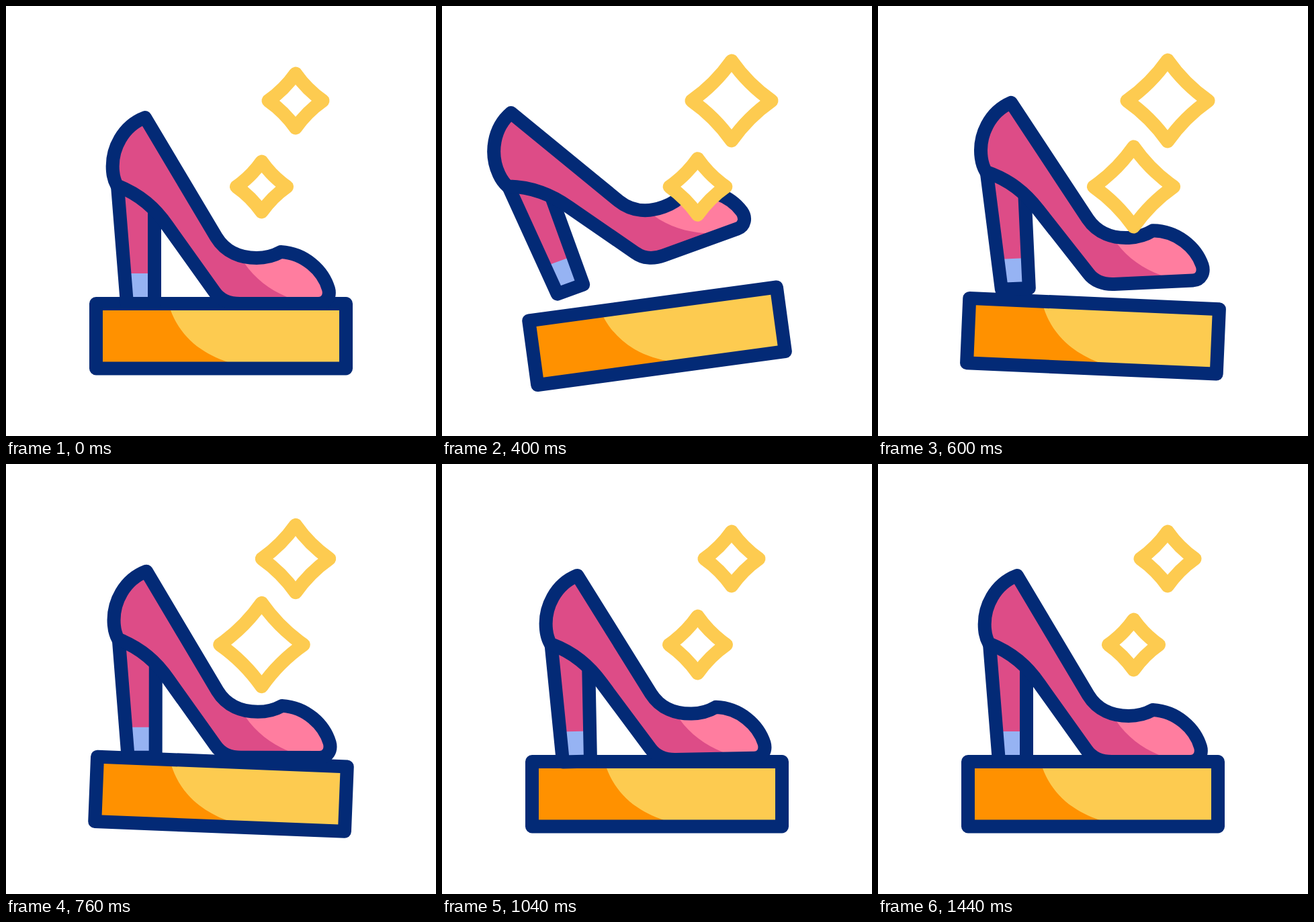
Write an HTML page that moves like this. It is 640 px wide and 640 px high and loops after 1.52 s.

```html
<!DOCTYPE html>
<html lang="en">
<head>
<meta charset="utf-8">
<title>Shoe on a stand</title>
<style>
  html, body { margin: 0; width: 100%; height: 100%; overflow: hidden; background: #fff; }
  svg { display: block; width: 100%; height: 100%; }
  .line { fill: none; stroke: #032a76; stroke-width: 20; stroke-linejoin: round; stroke-linecap: round; }
  .star { fill: #fff; stroke: #fdcb50; stroke-width: 20; stroke-linejoin: round; }
</style>
</head>
<body>
<svg viewBox="0 0 640 640">
  <defs>
    <path id="body" d="M207 166C175 178 156 212 159 246Q160 258 165 267C200 281 222 301 240 327
      L310 425C318 437 332 443 348 443H465C477 443 483 432 480 421
      C472 394 445 368 409 366C400 371 388 375 373 375C350 375 327 367 313 344Z"/>
    <clipPath id="inside"><use href="#body"/></clipPath>
  </defs>

  <g id="stand">
    <path fill="#fdcb50" d="M134 443H506V540H134Z"/>
    <path fill="#ff9100" d="M134 443H241L245 453C259 490 288 516 330 530V540H134Z"/>
    <path class="line" d="M134 443H506V539.5H134Z"/>
  </g>

  <g id="shoe">
    <path fill="#dd4c87" d="M166 268L180 443H221V303Z"/>
    <path fill="#96b3f3" d="M176.4 398L180 443H221V398Z"/>
    <path class="line" d="M166 268L180 443H221V303"/>
    <use href="#body" fill="#dd4c87"/>
    <path clip-path="url(#inside)" fill="#ff7d9f" d="M349 374L355 383C370 405 392 422 418 433L440 443H500V350H349Z"/>
    <use href="#body" class="line"/>
  </g>

  <path id="bigStar" class="star" transform="translate(431 141)"/>
  <path id="smallStar" class="star" transform="translate(380.5 269)"/>
</svg>
<script>
  const LOOP = 1520, STEP = 40;
  const [stand, shoe, bigStar, smallStar] =
    ['stand', 'shoe', 'bigStar', 'smallStar'].map(id => document.getElementById(id));

  function ease(t, from, to) {
    const u = Math.min(1, Math.max(0, (t - from) / (to - from)));
    return u * u * (3 - 2 * u);
  }

  // Rises from 0 to 1 at the peak, stays for the hold, then falls back to 0.
  const pulse = (t, start, peak, end, hold = 0) =>
    ease(t, start, peak) * (1 - ease(t, peak + hold, end));

  function setStar(star, t, rest, gain) {
    const r = rest + gain * pulse(t, 98, 485, 965, 40);
    const c = r * 0.412;
    star.setAttribute('d',
      `M0 ${-r}Q${c} ${-c} ${r} 0Q${c} ${c} 0 ${r}Q${-c} ${c} ${-r} 0Q${-c} ${-c} 0 ${-r}Z`);
  }

  function draw(t) {
    const tilt = -8.2 * pulse(t, 50, 366, 638) + 3.1 * pulse(t, 366, 638, 1000);
    stand.setAttribute('transform', `rotate(${tilt} 320 491)`);

    // The shoe swings back, overshoots and settles while it hops.
    const turn = -20 * pulse(t, 78, 412, 668) + pulse(t, 412, 668, 910) - 1.9 * pulse(t, 668, 910, 1210);
    const x = -9.5 * pulse(t, 110, 400, 630) + 4.5 * pulse(t, 400, 630, 850);
    const y = -27.5 * pulse(t, 205, 488, 883);
    shoe.setAttribute('transform', `translate(${x} ${y}) rotate(${turn} 200 443)`);

    setStar(bigStar, t, 40.5, 21.7);
    setStar(smallStar, t - 200, 37.5, 25.2);
  }

  const begin = performance.now();
  function tick() {
    const elapsed = (performance.now() - begin) % LOOP;
    draw(Math.floor(elapsed / STEP) * STEP);
    requestAnimationFrame(tick);
  }
  tick();
</script>
</body>
</html>
```
